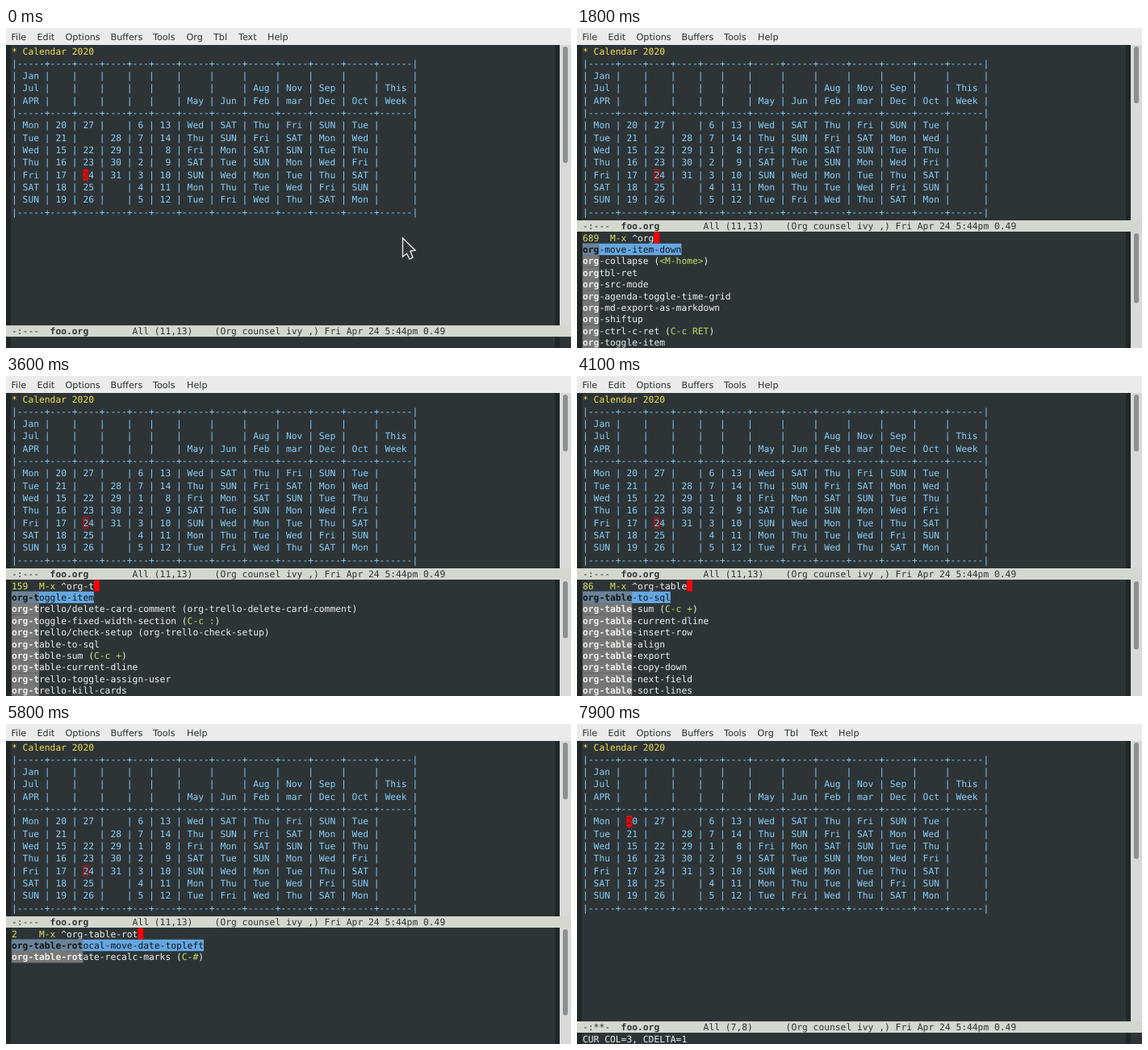
Recreate the animation shown at these times as an HTML page with a canvas. Size 700 by 396 pixels, loop 8000 ms.

```html
<!DOCTYPE html>
<html lang="en">
<head>
<meta charset="utf-8">
<title>Calendar table</title>
<style>
  html, body { margin: 0; width: 100%; height: 100%; overflow: hidden; background: #2e3436; }
  canvas { display: block; }
</style>
</head>
<body>
<canvas id="stage" width="700" height="396"></canvas>
<script>
const ctx = document.getElementById('stage').getContext('2d');
const LOOP = 8000, CELL = 6.8, LEFT = 7, ROW = 15.33, MINI_ROW = 14.4;
const MONO = '11.3px "DejaVu Sans Mono", monospace';
const SANS = '11.2px "DejaVu Sans", sans-serif';
const BG = '#2e3436', FRINGE = '#212627', RED = '#fb0007', WHITE = '#eeeeec',
  BLUE = '#87cefa', YELLOW = '#f2e24f', PROMPT = '#dcdc62', KEY = '#bcdc64',
  MODE = '#d3d7cf', SELECTED = '#65a7e2', MATCH = '#777777', SELECTED_MATCH = '#6b8299';

const WIDTHS = [5, 4, 4, 4, 3, 4, 5, 5, 5, 5, 5, 5, 6];
const rule = '|' + WIDTHS.map(w => '-'.repeat(w)).join('+') + '|';
const tableRow = text => {
  const cells = text.split(',');
  return '|' + WIDTHS.map((w, i) => (cells[i] || '').padStart(w - 1) + ' ').join('|') + '|';
};
const TABLE = [
  rule,
  ...['Jan', 'Jul,,,,,,,,Aug,Nov,Sep,,This', 'APR,,,,,,May,Jun,Feb,mar,Dec,Oct,Week'].map(tableRow),
  rule,
  ...[
    'Mon,20,27,,6,13,Wed,SAT,Thu,Fri,SUN,Tue',
    'Tue,21,,28,7,14,Thu,SUN,Fri,SAT,Mon,Wed',
    'Wed,15,22,29,1,8,Fri,Mon,SAT,SUN,Tue,Thu',
    'Thu,16,23,30,2,9,SAT,Tue,SUN,Mon,Wed,Fri',
    'Fri,17,24,31,3,10,SUN,Wed,Mon,Tue,Thu,SAT',
    'SAT,18,25,,4,11,Mon,Thu,Tue,Wed,Fri,SUN',
    'SUN,19,26,,5,12,Tue,Fri,Wed,Thu,SAT,Mon'
  ].map(tableRow),
  rule
];

const ALL = ['calc-right-justify', 'magit-wip-mode', 'ediff-mark-for-operation-at-pos',
  'html-headline-6', 'org-move-item-down', 'gnus-score-mode',
  'desktop-save-in-desktop-dir', 'magit-subtree:--onto', 'package-refresh-contents'];
const ORG = ['org-move-item-down', 'org-collapse (<M-home>)', 'orgtbl-ret', 'org-src-mode',
  'org-agenda-toggle-time-grid', 'org-md-export-as-markdown', 'org-shiftup',
  'org-ctrl-c-ret (C-c RET)', 'org-toggle-item'];
const ORG_T = ['org-toggle-item', 'org-trello/delete-card-comment (org-trello-delete-card-comment)',
  'org-toggle-fixed-width-section (C-c :)', 'org-trello/check-setup (org-trello-check-setup)',
  'org-table-to-sql', 'org-table-sum (C-c +)', 'org-table-current-dline',
  'org-trello-toggle-assign-user', 'org-trello-kill-cards'];
const TABLES = ['org-table-to-sql', 'org-table-sum (C-c +)', 'org-table-current-dline',
  'org-table-insert-row', 'org-table-align', 'org-table-export', 'org-table-copy-down',
  'org-table-next-field', 'org-table-sort-lines'];
const ROTATE = ['org-table-rotocal-move-date-topleft', 'org-table-rotate-recalc-marks (C-#)',
  'org-table-recalculate-buffer-tables', 'org-table-recalculate'];

// [start ms, typed text, number of matches, candidates]
const TYPING = [
  [100, '', 6990, ALL], [800, 'o', 745, ORG], [1000, 'or', 703, ORG], [1200, 'org', 689, ORG],
  [3300, 'org-', 656, ORG], [3500, 'org-t', 159, ORG_T], [3700, 'org-ta', 92, TABLES],
  [3800, 'org-tab', 86, TABLES], [3900, 'org-tabl', 86, TABLES], [4000, 'org-table', 86, TABLES],
  [4600, 'org-table-', 84, TABLES], [4800, 'org-table-r', 4, ROTATE],
  [5000, 'org-table-ro', 2, ROTATE], [5500, 'org-table-rot', 2, ROTATE]
];

function box(color, x, y, w, h) {
  ctx.fillStyle = color;
  ctx.fillRect(x, y, w, h);
}

// Text on the character grid; y is the middle of the line
function print(text, col, y, color, bold) {
  ctx.font = (bold ? 'bold ' : '') + MONO;
  ctx.fillStyle = color;
  [...text].forEach((c, i) => ctx.fillText(c, LEFT + (col + i) * CELL, y + 4));
}

function menu(items) {
  ctx.font = SANS;
  box('#ebebeb', 0, 0, 700, 21);
  ctx.fillStyle = '#2b2f30';
  for (const [label, x] of items) ctx.fillText(label, x, 14.5);
}

function scrollBar(top, height, share) {
  box('#d9d9d7', 686, top, 14, height);
  ctx.fillStyle = '#8b8f90';
  ctx.beginPath();
  ctx.roundRect(690, top + 2, 6, (height - 4) * share, 3);
  ctx.fill();
}

function modeLine(y, flags, position) {
  box(MODE, 0, y, 700, 14);
  const mid = y + 7;
  print(flags, 0, mid, BG);
  print('foo.org', 7, mid, BG, true);
  print(`All (${position})`, 22, mid, BG);
  print('(Org counsel ivy ,) Fri Apr 24 5:44pm 0.49', 37, mid, BG);
}

function calendar(line, col, active) {
  print('* Calendar 2020', 0, 28.5, YELLOW);
  TABLE.forEach((text, i) => print(text, 0, 28.5 + ROW * (i + 1), BLUE));
  const x = LEFT + col * CELL, y = 28.5 + ROW * (line - 1);
  if (active) {
    box(RED, x, y - 7, CELL, 14);
    print(TABLE[line - 2][col], col, y, BG);
  } else {
    ctx.strokeStyle = RED;
    ctx.lineWidth = 1;
    ctx.strokeRect(x + .5, y - 6.5, CELL - 1, 13);
  }
}

function candidate(text, y, matched, selected) {
  const split = matched.length;
  if (selected) box(SELECTED, LEFT, y - 7.2, text.length * CELL, MINI_ROW);
  box(selected ? SELECTED_MATCH : MATCH, LEFT, y - 7.2, split * CELL, MINI_ROW);
  const ink = selected ? '#101416' : WHITE;
  print(text.slice(0, split), 0, y, ink, true);
  print(text.slice(split), split, y, ink);
  const key = text.match(/\((?!org)(.+)\)/);
  if (key) {
    box(BG, LEFT + (key.index + 1) * CELL, y - 7, key[1].length * CELL, MINI_ROW - .4);
    print(key[1], key.index + 1, y, KEY);
  }
}

function minibuffer([, typed, count, list]) {
  const shown = list.filter(name => name.startsWith(typed));
  const prompt = String(count).padEnd(5) + 'M-x ';
  const y = 259.5, input = '^' + typed;
  print(prompt, 0, y, PROMPT);
  print(input, prompt.length, y, WHITE);
  box(RED, LEFT + (prompt.length + input.length) * CELL, y - 7, CELL, 14);
  shown.forEach((text, i) => candidate(text, y + MINI_ROW * (i + 1), typed, i === 0));
  const size = (prompt + input + shown.join(' ')).length;
  scrollBar(252, 144, 300 / (300 + size));
}

function pointer() {
  ctx.beginPath();
  [[491.5, 260], [491.5, 283], [496.5, 279], [500, 286], [504, 284], [501, 276], [507, 275]]
    .forEach(([x, y]) => ctx.lineTo(x, y));
  ctx.closePath();
  ctx.fillStyle = '#303537';
  ctx.strokeStyle = '#e8e8e8';
  ctx.lineWidth = 1.4;
  ctx.fill();
  ctx.stroke();
}

function draw(t) {
  const prompting = t >= 100 && t < 7000, moved = t >= 7800;
  const modeY = prompting ? 238 : 368;
  ctx.textRendering = 'geometricPrecision';
  box(BG, 0, 0, 700, 396);
  box(FRINGE, 0, 21, 6, 375);
  box(FRINGE, 680, 21, 6, 375);

  const common = [['File', 6.5], ['Edit', 38.5], ['Options', 73.5], ['Buffers', 129.5], ['Tools', 182]];
  menu(common.concat(prompting ? [['Help', 224]]
    : [['Org', 223.5], ['Tbl', 257], ['Text', 288], ['Help', 324]]));
  scrollBar(21, modeY - 21, prompting ? .33 : .42);
  if (moved) calendar(7, 8, true);
  else calendar(11, 13, !prompting);
  modeLine(modeY, moved ? '-:**-' : '-:---', moved ? '7,8' : '11,13');

  if (prompting) minibuffer(TYPING.findLast(step => t >= step[0]));
  else if (t >= 7000) print('CUR COL=3, CDELTA=1', 0, 389.5, WHITE);
  if (t < 800) pointer();
}

function tick() {
  draw(performance.now() % LOOP);
  requestAnimationFrame(tick);
}
tick();
</script>
</body>
</html>
```
